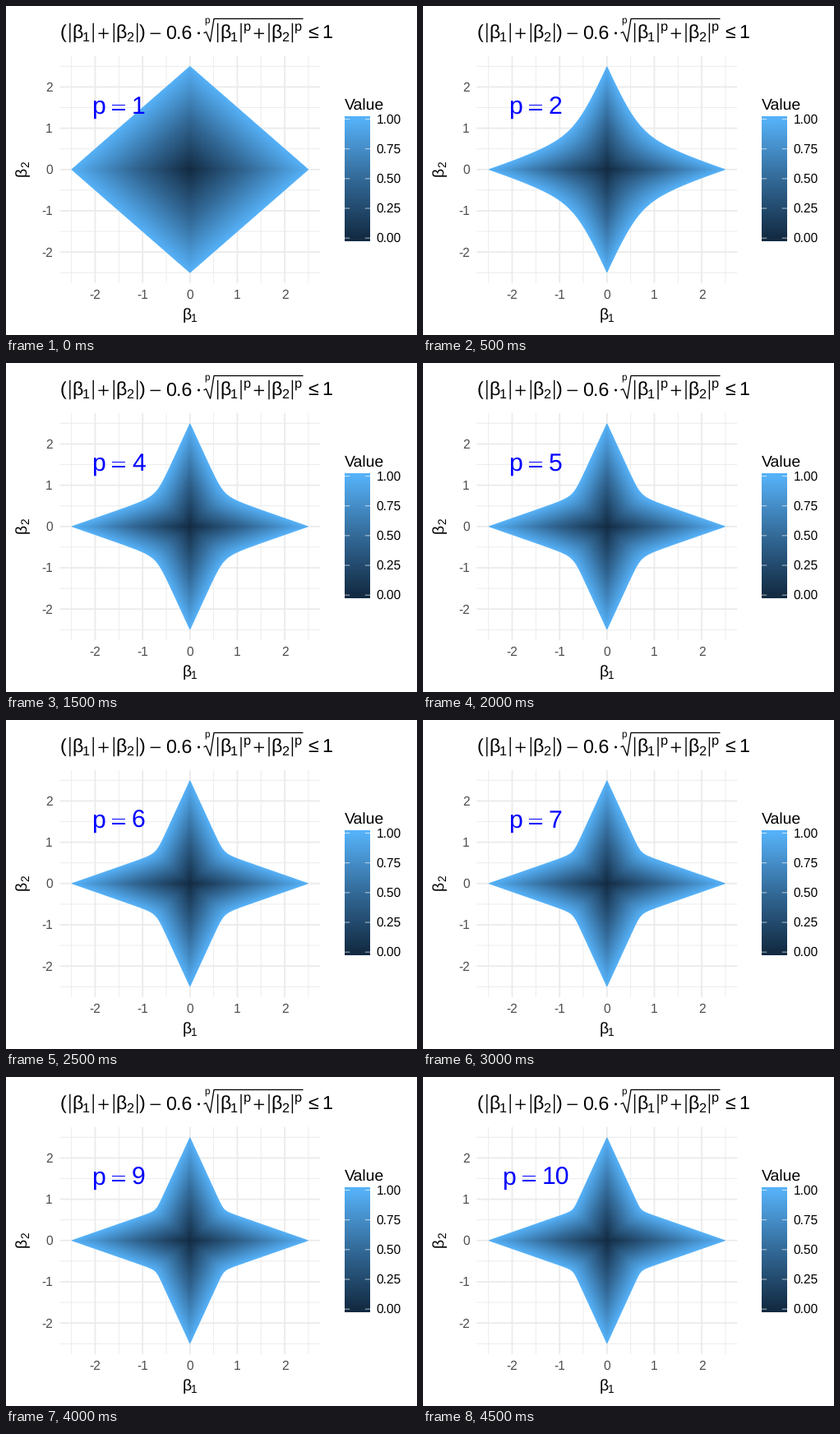
A matplotlib script for the animation above (5 s loop, 500 by 400 pixels).

```python
import numpy as np
import matplotlib.pyplot as plt
from matplotlib.animation import FuncAnimation
from matplotlib.colors import LinearSegmentedColormap
from matplotlib.patches import Circle, Rectangle

plt.rcParams["font.family"] = "Liberation Sans"
plt.rcParams["text.hinting"] = "none"

W, H = 500, 400
PT = 0.72                      # points per pixel at 100 dpi
X0, Y0 = 223.8, 198.8          # pixel position of the data origin
UX, UY = 57.65, 50.2           # pixels per data unit
LEFT, RIGHT = X0 - 2.75 * UX, X0 + 2.75 * UX
TOP, BOTTOM = Y0 - 2.75 * UY, Y0 + 2.75 * UY
TICK, LABEL, TITLE, NOTE = 15.5, 19.4, 23.3, 30.1
GRID, GREY, BLUE = "#EBEBEB", "#4D4D4D", "#0000FF"

blues = LinearSegmentedColormap.from_list(
    "blues", ["#132B43", "#336A98", "#56B1F7"], N=512)

fig = plt.figure(figsize=(W / 100, H / 100), dpi=100, facecolor="white")
ax = fig.add_axes([0, 0, 1, 1])
ax.set_axis_off()


def text(x, y, s, size, color="black", ha="left", **kw):
    return ax.text(x, y, s, fontsize=size * PT, color=color, ha=ha,
                   va="baseline", **kw)


def line(xs, ys, width, color="black", z=2, **kw):
    ax.plot(xs, ys, color=color, lw=width * PT, zorder=z, snap=False,
            solid_capstyle="butt", **kw)


def plus(x, y, r=6.2):
    line([x - r, x + r], [y, y], 1.4)
    line([x, x], [y - r, y + r], 1.4)


def beta(x, y, sub, size, gap, drop):
    text(x, y, "β", size)
    text(x + gap, y + drop, sub, size * 0.7)


def abs_beta(x, y, sub):
    """|β| with a subscript, the left bar at x."""
    for b in (x, x + 28.4):
        line([b, b], [y - 18.5, y + 5], 1.4)
    beta(x + 2.5, y, sub, TITLE, 12.8, 4)


def draw_grid():
    for v in np.arange(-2.5, 2.6, 0.5):
        width = 1.88 if v == int(v) else 0.94
        z = 1 if v == int(v) else 0.5
        x, y = X0 + v * UX, Y0 - v * UY
        line([x, x], [TOP, BOTTOM], width, GRID, z)
        line([LEFT, RIGHT], [y, y], width, GRID, z)
    for v in range(-2, 3):
        text(X0 + v * UX, 356.2, str(v), TICK, GREY, "center")
        text(56.6, Y0 - v * UY + 5.4, str(v), TICK, GREY, "right")


def draw_axis_titles():
    beta(214.2, 380.8, "1", LABEL, 10.8, 3.5)
    turn = dict(rotation=90, rotation_mode="anchor")
    text(24.8, 206.6, "β", LABEL, **turn)
    text(28.3, 195.8, "2", LABEL * 0.7, **turn)


def draw_title():
    base, mid, rise = 39.3, 33.4, 29.4
    text(65.2, base, "(", TITLE)
    abs_beta(77.8, base, "1")
    plus(118.6, mid)
    abs_beta(131.3, base, "2")
    text(162, base, ")", TITLE)
    line([175.5, 188], [mid, mid], 1.4)
    text(194, base, "0.6", TITLE)
    ax.add_patch(Circle((234.5, mid - 0.4), 1.5, color="black", lw=0))

    text(241.5, 21, "p", 11.6)
    line([240.5, 243.5, 248.5, 253, 361.5], [33, 31.5, 43.5, 15.5, 15.5],
         1.3, solid_joinstyle="miter")
    abs_beta(257.6, base, "1")
    text(288.6, rise, "p", TITLE * 0.7)
    plus(307.8, mid)
    abs_beta(320, base, "2")
    text(350.8, rise, "p", TITLE * 0.7)
    text(367.2, base, "≤", TITLE)
    text(384.6, base, "1", TITLE)


def draw_legend():
    x0, x1, top, bottom = 412, 443, 134, 286
    hi, lo = 137.7, 282.1
    text(412.4, 125.8, "Value", LABEL)
    rows = np.arange(top, bottom) + 0.5
    ramp = np.clip((lo - rows) / (lo - hi), 0, 1)
    ax.imshow(blues(ramp)[:, None, :], extent=(x0, x1, bottom, top),
              interpolation="nearest", aspect="auto", zorder=2)
    for v in (0, 0.25, 0.5, 0.75, 1):
        y = lo + (hi - lo) * v
        line([x0, x0 + 6.2], [y, y], 0.66, "white", 3)
        line([x1 - 6.2, x1], [y, y], 0.66, "white", 3)
        text(450.4, y + 5.2, f"{v:.2f}", TICK)


# pixel window that holds the shape
PX0, PX1, PY0, PY1 = 76, 373, 70, 329
b1, b2 = np.meshgrid(np.abs(np.arange(PX0, PX1) + 0.5 - X0) / UX,
                     np.abs(np.arange(PY0, PY1) + 0.5 - Y0) / UY)


def region(p):
    value = b1 + b2 - 0.6 * (b1 ** p + b2 ** p) ** (1 / p)
    dy, dx = np.gradient(value)
    rgba = blues(np.clip(value, 0, 1))
    slope = np.maximum(np.hypot(dx, dy), 1e-6)
    rgba[..., 3] = np.clip((1 - value) / slope + 0.8, 0, 1)
    return rgba


draw_grid()
draw_axis_titles()
draw_title()
draw_legend()

shape = ax.imshow(region(1), extent=(PX0, PX1, PY1, PY0),
                  interpolation="nearest", aspect="auto", zorder=2)
NOTE_Y = 131.2
DIGIT_DX = 48.4                # from the letter to the number
note_p = text(0, NOTE_Y, "p", NOTE, BLUE, zorder=4)
note_n = text(0, NOTE_Y, "", NOTE, BLUE, zorder=4)
equals = [ax.add_patch(Rectangle((0, NOTE_Y - h), 15.9, 1.7, color=BLUE,
                                 lw=0, zorder=4)) for h in (11.7, 5.9)]

ax.set_xlim(0, W)
ax.set_ylim(H, 0)


def update(i):
    p = i + 1
    shape.set_data(region(p))
    digits = str(p)
    left = 137 - (DIGIT_DX + 0.556 * NOTE * len(digits)) / 2
    note_p.set_x(left)
    note_n.set_x(left + DIGIT_DX)
    note_n.set_text(digits)
    for r in equals:
        r.set_x(left + 24.6)
    return [shape, note_p, note_n, *equals]


anim = FuncAnimation(fig, update, frames=10, interval=500, repeat=True,
                     repeat_delay=0, blit=False)
plt.show()
```
